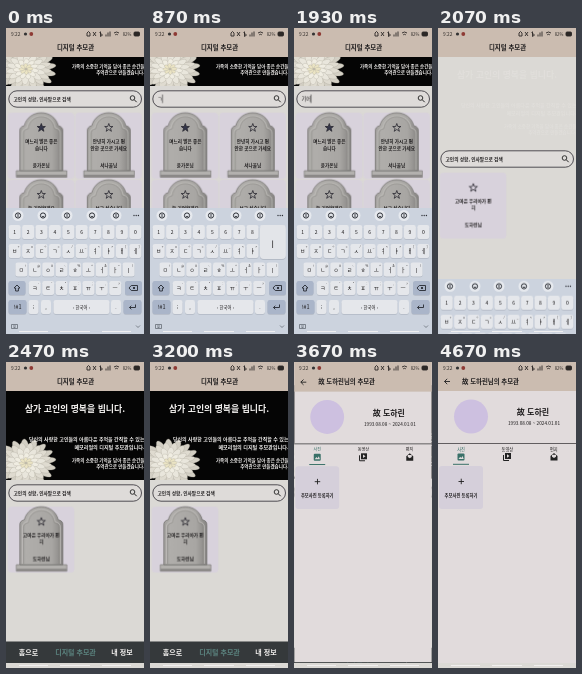
An HTML page that plays this animation: 138x306 px, repeating every 4.79 s.

```html
<!DOCTYPE html>
<html lang="ko">
<head>
<meta charset="utf-8">
<title>디지털 추모관</title>
<style>
html, body { margin: 0; width: 100%; height: 100%; overflow: hidden; background: #dbd9d5; }
svg { display: block; width: 100vw; height: 100vh; }
text { font-family: "Noto Sans CJK KR", "Noto Sans CJK", "Noto Sans", sans-serif; fill: #1d1b1c; }
.loop { animation: 4790ms linear infinite; }
.cut { animation: 4790ms step-end infinite; }

#scroll { animation-name: scroll; }
@keyframes scroll { 0% { transform: translateY(-60px); } 41.1% { transform: none; } }
.photo { animation-name: photo; }
@keyframes photo {
  0%, 41.09% { opacity: 1; }
  41.1%, 44.4% { opacity: 0; }
  51%, 100% { opacity: 1; }
}
#verse { animation-name: verse; }
@keyframes verse {
  0%, 41.09% { opacity: 1; }
  41.1%, 41.8% { opacity: 0; }
  48%, 100% { opacity: 1; }
}
.before { animation-name: before; }
@keyframes before { 0% { opacity: 1; } 41.1%, 100% { opacity: 0; } }
.after { animation-name: after; }
@keyframes after { 0% { opacity: 0; } 41.1%, 100% { opacity: 1; } }

#hint { animation-name: hint; }
@keyframes hint { 0% { opacity: 1; } 9.4% { opacity: 0; } 41.1%, 100% { opacity: 1; } }
.typed { opacity: 0; }
#t0 { animation-name: t0; }
@keyframes t0 { 0% { opacity: 0; } 9.4% { opacity: 1; } 16.7%, 100% { opacity: 0; } }
#t1 { animation-name: t1; }
@keyframes t1 { 0% { opacity: 0; } 16.7% { opacity: 1; } 19.4%, 100% { opacity: 0; } }
#t2 { animation-name: t2; }
@keyframes t2 { 0% { opacity: 0; } 19.4% { opacity: 1; } 23.6%, 100% { opacity: 0; } }
#t3 { animation-name: t3; }
@keyframes t3 { 0% { opacity: 0; } 23.6% { opacity: 1; } 27.9%, 100% { opacity: 0; } }
#t4 { animation-name: t4; }
@keyframes t4 { 0% { opacity: 0; } 27.9% { opacity: 1; } 41.1%, 100% { opacity: 0; } }

.pop { opacity: 0; animation-name: pop; }
@keyframes pop { 0% { opacity: 1; } 2.3%, 100% { opacity: 0; } }
#keyboard { animation-name: keyboard; }
@keyframes keyboard {
  0% { transform: none; }
  41.1% { transform: none; animation-timing-function: cubic-bezier(.5, 1, .89, 1); }
  47.4%, 100% { transform: translateY(126px); }
}

.page { transform-origin: 69px 150px; }
#list { animation-name: leave; }
@keyframes leave {
  0% { transform: none; }
  70.98% { transform: scale(1); animation-timing-function: cubic-bezier(.33, 1, .68, 1); }
  79.3%, 100% { transform: scale(1.05); }
}
#detail { animation-name: enter; }
@keyframes enter {
  0%, 70.98% { transform: scale(.85); animation-timing-function: cubic-bezier(.33, 1, .68, 1); }
  79.3%, 100% { transform: scale(1); }
}
#veil { animation-name: veil; }
@keyframes veil { 0%, 70.98% { opacity: 0; } 74.2%, 100% { opacity: 1; } }
#dot { animation-name: dot; }
@keyframes dot { 0% { opacity: 1; } 57% { opacity: .7; } 66.8% { opacity: 1; } 87.7% { opacity: .7; } 97.5%, 100% { opacity: 1; } }
</style>
</head>
<body>
<svg viewBox="0 0 138 306" preserveAspectRatio="none">
  <defs>
    <clipPath id="app"><rect width="138" height="301"/></clipPath>
    <clipPath id="banner"><rect y="29" width="138" height="89"/></clipPath>
    <linearGradient id="stone">
      <stop stop-color="#a19f9c"/><stop offset=".15" stop-color="#b0aeab"/>
      <stop offset=".75" stop-color="#a8a6a3"/><stop offset="1" stop-color="#868482"/>
    </linearGradient>
    <path id="star" d="M0-4.2 1.1-1.2 4.1-1.2 1.7.7 2.6 3.6 0 1.8-2.6 3.6-1.7.7-4.1-1.2-1.1-1.2Z"/>
    <g id="tomb" stroke-width=".7">
      <path d="M-25 43H25.500V49.500H-25Z" fill="#b3b1ae" stroke="#7d7b79"/>
      <path d="M-25 47H25.500V49.500H-25Z" fill="#8a8886"/>
      <path d="M-21.500 43V4Q-22-1-17-2C-15-10-8-15 0-15S15-10 17-2Q22-1 21.500 4V43Z" fill="url(#stone)" stroke="#6f6d6b"/>
      <path d="M-19 42V5Q-19 1-14 0C-13-8-7-12 0-12S13-8 14 0Q19 1 19 5V42" fill="none" stroke="#c6c4c1"/>
      <path d="M-17.800 42V6Q-18 2-13 1C-12-7-6-11 0-11S12-7 13 1Q18 2 17.800 6V42" fill="none" stroke="#8a8885" stroke-width=".5"/>
    </g>
  </defs>
  <rect width="138" height="306" fill="#dbd9d5"/>

  <g clip-path="url(#app)">
    <g id="list" class="page loop">
      <rect width="138" height="301" fill="#dbd9d5"/>
      <g id="scroll" class="cut">
        <g class="photo loop" clip-path="url(#banner)">
          <rect y="29" width="138" height="89" fill="#050505"/>
          <g id="flower" transform="translate(20 101)"/>
        </g>
        <g id="verse" class="loop"></g>
        <rect x="2.800" y="122.800" width="132.700" height="16.400" rx="8.200" fill="#dedbd9" stroke="#2b2930" stroke-width=".8"/>
        <g id="field"></g>
        <g fill="none" stroke="#222"><circle cx="126.500" cy="130" r="2.300" stroke-width=".9"/><path d="m128.200 131.700 2.500 2.500"/></g>
        <g id="cards"></g>
      </g>
      <rect width="138" height="29" fill="#cbbcb0"/>
      <g id="nav"><rect y="279.500" width="138" height="22" fill="#35393b"/></g>
    </g>

    <g id="veil" class="loop">
      <g id="detail" class="page loop">
        <rect width="138" height="301" fill="#e1dbdc"/>
        <rect width="138" height="29" fill="#cbbcb0"/>
        <path d="M12 19.500H6.500M9.200 16.800 6.500 19.500l2.700 2.700" fill="none" stroke="#222" stroke-width=".9"/>
        <circle cx="33" cy="54.500" r="17" fill="#cdc0e0"/>
        <path d="M0 81.500H138" stroke="#403e40" stroke-width=".8"/>
        <path d="M15 102.300H31" stroke="#397068"/>
        <rect x="1" y="104" width="44" height="43" rx="3" fill="#d5cfda"/>
        <path d="M20.500 119.500h5.500M23.250 116.700v5.500" stroke="#222" stroke-width=".9"/>
        <g transform="translate(23 95)"><rect x="-3.500" y="-3.500" width="7" height="7" rx="1" fill="#397068"/><path d="m-2.500 2 1.700-2.200 1.100 1.200L1.600-1 2.700 2Z" fill="#e1dbdc"/></g>
        <g transform="translate(69 95)"><path d="M-3.500-2v5.500H2" fill="none" stroke="#222"/><rect x="-2" y="-4" width="6" height="6" fill="#222"/><path d="M0-2.800 2.500-1 0 .8Z" fill="#e1dbdc"/></g>
        <g transform="translate(116 95)"><path d="M-3.500-1 0-4 3.500-1V3.500H-3.500Z" fill="#222"/><path d="M-2-2.200H2V-.2L0 1-2-.2Z" fill="#e1dbdc"/></g>
      </g>
    </g>
  </g>

  <g id="keyboard" class="loop"><rect y="180" width="138" height="126" fill="#ccd3de"/></g>
  <path d="M13 303.500H42M54 303.500H84M96 303.500H125" stroke="#f3f2f2" stroke-width=".9"/>

  <g id="status">
    <circle id="dot" class="cut" cx="19.500" cy="6" r="1.600" fill="#333"/>
    <circle cx="25.300" cy="6" r="1.900" fill="#8e3a34"/>
    <g fill="none" stroke="#2c2826" stroke-width=".9">
      <path d="M81 8V5l1.500-1.500L84 5v3ZM87 4l3 4M90 4l-3 4M94.500 3.500v5l2-1.500-3-2.500M100 8.500v-2M102 8.500v-4M104 8.500v-5M108 5q2.500-2 5 0M109.200 6.800q1.300-1 2.600 0"/>
      <rect x="128" y="4" width="5.500" height="4" rx="1" fill="#2c2826"/>
    </g>
  </g>
</svg>
<script>
const $ = id => document.getElementById(id);

function add(parent, tag, attrs, content) {
  const el = document.createElementNS('http://www.w3.org/2000/svg', tag);
  for (const k in attrs) el.setAttribute(k, attrs[k]);
  if (content) el.textContent = content;
  return parent.appendChild(el);
}

// Text placed by its visual middle line
function label(parent, str, x, y, size, attrs = {}) {
  return add(parent, 'text', {
    x, y: y + size * .36, 'font-size': size, 'text-anchor': 'middle', ...attrs
  }, str);
}

const start = { 'text-anchor': 'start' };
const bold = { 'font-weight': 700 };
const white = 'fill:#f4f2f0';

function drawFlower() {
  const g = $('flower');
  add(g, 'ellipse', { rx: 21, ry: 18, fill: '#bcb8ac' });
  const rings = [[17, 26, 3.6, '#d3cfc4'], [17, 22, 3.3, '#dfdbd0'], [14, 17, 3, '#e9e6dc'], [11, 11, 2.4, '#f0ede2'], [8, 6, 1.6, '#ebe4c4']];
  for (const [count, len, w, fill] of rings)
    for (let i = 0; i < count; i++)
      add(g, 'ellipse', {
        cx: len * .58, rx: len * .43, ry: w, fill, stroke: '#a29e92', 'stroke-width': .25,
        transform: `scale(1.15 .92) rotate(${i * 360 / count + len * 7})`
      });
}

function drawVerse() {
  const g = $('verse');
  label(g, '삼가 고인의 명복을 빕니다.', 69, 46.5, 8.9, { ...bold, style: white });
  const lines = [
    ['당신의 사랑한 고인들의 아름다운 추억을 간직할 수 있는', 77.5, 5],
    ['메모리얼의 디지털 추모관입니다.', 85.5, 5.1],
    ['가족의 소중한 기억을 담아 좋은 순간들', 98, 4.5],
    ['추억관으로 만들겠습니다.', 104.5, 4.5]
  ];
  for (const [str, y, size] of lines)
    label(g, str, 138.5, y, size, { ...bold, 'text-anchor': 'end', style: white });
}

function drawField() {
  const g = $('field');
  label(g, '고인의 성함, 인사말으로 검색', 7.5, 131, 4.7, { ...start, ...bold, id: 'hint', class: 'cut' });
  ['', 'ㄱ', '기', '깅', '기어'].forEach((str, i) => {
    const t = add(g, 'g', { id: 't' + i, class: 'typed cut' });
    label(t, str, 7.5, 131, 5, start);
    add(t, 'rect', { x: 7.6 + str.length * 4.6, y: 126.5, width: .7, height: 8.5, fill: '#444' });
  });
}

function card(x, y, lines, name, cls, solid) {
  const g = add($('cards'), 'g', { class: cls + ' cut' });
  const c = add(g, 'g', { transform: `translate(${x} ${y})` });
  add(c, 'rect', { x: -33.5, y: -15, width: 66.5, height: 66, rx: 3.5, fill: '#d8d2dc' });
  add(c, 'use', { href: '#tomb', class: 'photo loop' });
  add(c, 'use', { href: '#star', fill: solid ? '#34364a' : 'none', stroke: '#292830', 'stroke-width': .8 });
  lines.forEach((str, i) => label(c, str, 0, 13.5 + i * 6.7, 4.6, bold));
  label(c, name, 0, 37.5, 4.6, bold);
}

function drawKeyboard() {
  const kb = $('keyboard'), spots = {};
  const light = '#e5e7eb', dark = '#aab5c9';
  const key = (str, x, y, w = 12, fill = light, size = 5) => {
    const box = { x: x - w / 2, width: w, height: 14, rx: 2.2 };
    add(kb, 'rect', { ...box, y: y - 6.3, fill: '#b1b8c3' });
    add(kb, 'rect', { ...box, y: y - 7, fill });
    label(kb, str, x, y, size, { 'font-weight': 500 });
    spots[str] = [x, y];
  };
  const row = (chars, x, y, marks = '') => [...chars].forEach((c, i) => {
    key(c, x + i * 13.4, y, 12, light, marks ? 5.6 : 5);
    if (marks) label(kb, marks[i], x + i * 13.4 + 3.8, y - 4, 3);
  });

  [12, 37, 61, 86, 110].forEach((x, i) => {
    add(kb, 'circle', { cx: x, cy: 187.5, r: 5.5, fill: '#e6e9ee' });
    add(kb, 'circle', { cx: x, cy: 187.5, r: 2.6, fill: 'none', stroke: '#2d3036', 'stroke-width': 1 });
    add(kb, 'path', { d: i % 2 ? `M${x - 1.2} 188q1.200 1.500 2.400 0` : `M${x} 186v3`, fill: 'none', stroke: '#2d3036', 'stroke-width': .9 });
  });
  for (let i = 0; i < 3; i++) add(kb, 'circle', { cx: 128 + i * 2.2, cy: 187.5, r: .7, fill: '#2d3036' });

  row('1234567890', 8.7, 204);
  row('ㅂㅈㄷㄱㅅㅛㅕㅑㅐㅔ', 8.7, 223, '+×÷=/_<>[]');
  row('ㅁㄴㅇㄹㅎㅗㅓㅏㅣ', 15.4, 241.5, '!@#~%^&*(');
  row('ㅋㅌㅊㅍㅠㅜㅡ', 28.8, 260, `-'":;,?`);
  key('', 11, 260, 17, dark);
  key('', 127.5, 260, 17, dark);
  key('!#1', 11.5, 279, 18, dark, 5.5);
  key('⁝', 27.5, 279, 10);
  key(',', 40, 279, 10);
  key('‹   한국어   ›', 75.5, 279, 56, light, 4.4);
  key('.', 110, 279, 10);
  key('', 126.5, 279, 18, dark);
  add(kb, 'path', {
    fill: 'none', stroke: '#262a31', 'stroke-width': .9,
    d: 'M11 257 8 260h1.600v3h2.800v-3H14ZM123 260l2.300-2.500h6.200v5h-6.200ZM127 259l2 2M129 259l-2 2M129.500 276.500v3h-6M125.300 277.700l-1.800 1.800 1.800 1.800'
  });
  add(kb, 'path', {
    fill: 'none', stroke: '#596069', 'stroke-width': .7,
    d: 'M5.500 296.500h6v4h-6ZM7 298h3M7.500 299.500h2M130 297.500l2 2 2-2'
  });

  // Enlarged bubbles above the pressed keys
  for (const [c, at] of [['ㄱ', 670], ['ㅣ', 840], ['ㅇ', 1010], ['ㅓ', 1210]]) {
    const [x, y] = spots[c];
    const g = add(kb, 'g', { class: 'pop cut', style: `animation-delay:${at}ms` });
    add(g, 'rect', { x: x - 12.7, y: y - 44, width: 26, height: 34.5, rx: 4, fill: '#b4bbc6' });
    add(g, 'rect', { x: x - 12.7, y: y - 44.5, width: 26, height: 34, rx: 4, fill: '#e3e5e9' });
    label(g, c, x, y - 26, 8.5);
  }
  const enter = add(kb, 'g', { class: 'pop cut', style: 'animation-delay:1800ms' });
  add(enter, 'rect', { x: 117.5, y: 272, width: 18, height: 14, rx: 2.2, fill: '#7887a2', opacity: .5 });
}

drawFlower();
drawVerse();
drawField();

card(35.3, 159.7, ['며느리 딸은 좋은', '습니다'], '윤가온님', 'before', true);
card(102.8, 159.7, ['안녕히 가시고 편', '안한 곳으로 가세요'], '서나울님', 'before');
card(35.3, 226.7, ['늘 기억할게요'], '하늬솔님', 'before');
card(102.8, 226.7, ['보고 싶습니다'], '노아름님', 'before');
card(35.3, 159.7, ['고마운 우리아가 편', '히'], '도하린님', 'after');

label($('list'), '디지털 추모관', 69.5, 19.5, 6.4, bold);
label($('nav'), '홈으로', 22.5, 290, 7, { ...bold, style: white });
label($('nav'), '디지털 추모관', 69.5, 290, 7, { ...bold, style: 'fill:#5c8580' });
label($('nav'), '내 정보', 116, 290, 7, { ...bold, style: white });

const page = $('detail');
label(page, '故 도하린님의 추모관', 24, 19.5, 6.4, { ...start, ...bold });
label(page, '故 도하린', 95, 50.5, 8, bold);
label(page, '1993.08.08 ~ 2024.01.01', 96, 61.5, 4.7, { 'font-weight': 500 });
['사진', '동영상', '편지'].forEach((str, i) =>
  label(page, str, 23 + i * 46.4, 87.5, 4.2, i ? {} : { style: 'fill:#397068' }));
label(page, '추모사진 등록하기', 23, 133.5, 4.3, bold);

label($('status'), '9:22', 5, 6, 4.8, { ...start, 'font-weight': 500, style: 'fill:#2c2826' });
label($('status'), '82%', 121, 6, 4.2, { 'font-weight': 500, style: 'fill:#2c2826' });

drawKeyboard();
</script>
</body>
</html>
```
